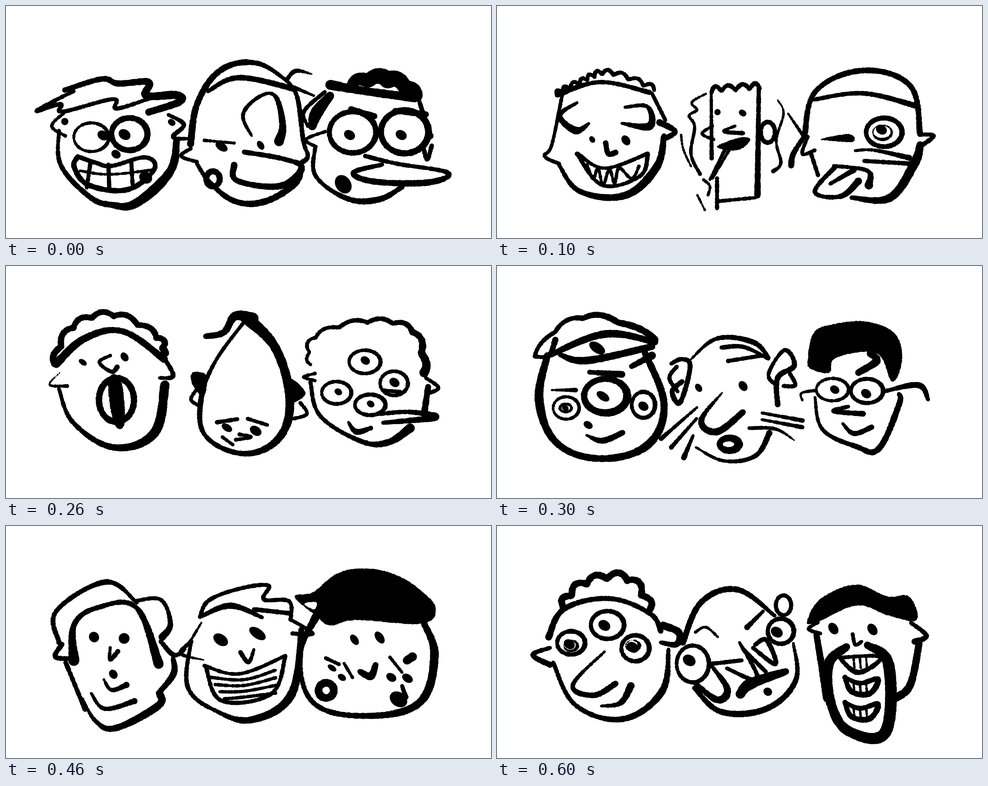
These frames come from a looping animation (1080 by 518 pixels, 0.7 s). An HTML page with a canvas:

```html
<!DOCTYPE html>
<html lang="en">
<head>
<meta charset="utf-8">
<title>Doodle heads</title>
<style>
html, body { margin: 0; width: 100%; height: 100%; overflow: hidden; background: #fff }
canvas { display: block; animation: flip 700ms steps(7) infinite }
@keyframes flip { to { transform: translateY(-100%) } }
</style>
</head>
<body>
<canvas id="strip" width="1080" height="3626"></canvas>
<script>
const ctx = document.getElementById('strip').getContext('2d');
let seed = 7;
const rough = () => (seed = seed * 16807 % 2147483647) / 2147483647 - 0.5;

// Samples a smooth curve through "x y x y ..." as [x, y, progress].
function curve(text, closed) {
  const n = text.split(' ').map(Number), count = n.length / 2, out = [];
  const spans = closed ? count : count - 1;
  const at = (i, k) => n[2 * (closed ? (i + count) % count : Math.max(0, Math.min(count - 1, i))) + k];
  for (let i = 0; i < spans; i++) {
    const steps = Math.ceil(Math.hypot(at(i + 1, 0) - at(i, 0), at(i + 1, 1) - at(i, 1)) / 2) || 1;
    for (let s = 0; s <= steps; s++) {
      const t = s / steps, r = 1 - t;
      const mix = k => {
        const b = at(i, k), c = at(i + 1, k);
        const from = (c - at(i - 1, k)) * 0.55, to = (at(i + 2, k) - b) * 0.55;
        return r * r * (1 + 2 * t) * b + t * t * (3 - 2 * t) * c + r * r * t * from - t * t * r * to;
      };
      out.push([mix(0), mix(1), (i + t) / spans]);
    }
  }
  return out;
}

// Brush stroke; the widths are spread evenly along it.
function ink(samples, widths) {
  ctx.beginPath();
  for (const [x, y, u] of samples) {
    const p = u * (widths.length - 1), i = Math.floor(p);
    const w = widths[i] + ((widths[i + 1] ?? widths[i]) - widths[i]) * (p - i);
    const r = w / 2 + rough() * 1.3;
    ctx.moveTo(x + r, y);
    ctx.arc(x, y, r, 0, 7);
  }
  ctx.fill();
}
const line = (text, ...w) => ink(curve(text), w.length ? w : [9]);

// Stroke with bumps standing out on its left side.
function curls(text, bumps, height, ...w) {
  const base = curve(text);
  ink(base.map(([x, y, u], i) => {
    const [a, b] = [base[Math.max(0, i - 2)], base[Math.min(base.length - 1, i + 2)]];
    const dx = b[0] - a[0], dy = b[1] - a[1], len = Math.hypot(dx, dy) || 1;
    const h = height * Math.abs(Math.sin(u * bumps * Math.PI)) / len;
    return [x + dy * h, y - dx * h, u];
  }), w);
}

function blob(text, color = '#000') {
  ctx.fillStyle = color;
  ctx.beginPath();
  for (const [x, y] of curve(text, true)) ctx.lineTo(x + rough() * 1.5, y + rough() * 1.5);
  ctx.fill();
  ctx.fillStyle = '#000';
}

function dot(x, y, rx, ry = rx) {
  ctx.beginPath();
  ctx.ellipse(x, y, rx, ry, rx === ry ? 0 : rx > ry ? 0.6 : -0.6, 0, 7);
  ctx.fill();
}

// Widths run clockwise from the right.
function ring(x, y, rx, ry, ...w) {
  const steps = Math.ceil((rx + ry) * 1.6);
  ink(Array.from({ length: steps + 1 }, (_, i) => {
    const a = i / steps * 2 * Math.PI;
    return [x + rx * Math.cos(a), y + ry * Math.sin(a), i / steps];
  }), w);
}

function eye(x, y, rx, ry, w, px, py, size) {
  ring(x, y, rx, ry, w + 1, w, w - 1, w, w + 1);
  dot(px, py, size, size * 0.8);
}

function gritted() {
  line('130 188 213 163 250 173 318 170 312 200 380 199 386 214 318 237', 11, 14, 18, 15);
  line('150 190 68 234 122 219 126 236 238 208 246 229 318 207');
  line('118 278 122 355 185 425 235 444 290 440 365 370 380 300', 8, 11, 14, 22, 14);
  line('130 238 102 268 132 290', 7);
  dot(131, 258, 8);
  line('362 243 396 265 372 293 415 296', 8, 11, 6);
  dot(369, 260, 9, 7);
  eye(190, 293, 39, 32, 7, 216, 289, 13);
  eye(275, 286, 40, 36, 13, 264, 287, 14);
  dot(245, 331, 11, 9);
  line('160 336 200 350 235 357 310 338 330 365 270 410 185 400 152 360 160 336', 10, 9, 12, 11);
  line('188 350 180 405');
  line('228 354 230 408');
  line('279 347 282 400');
  line('165 368 230 376 325 366', 6);
  dot(311, 383, 15, 13);
}

function smirk() {
  line('411 308 427 215 480 142 560 128 632 172', 15, 14, 13, 6);
  line('450 190 520 160 645 186', 9, 12, 13);
  line('625 165 645 145 681 152', 8, 10, 3);
  line('640 181 685 200', 9, 5);
  line('620 162 648 202 662 300 672 335 658 350', 6, 11, 9, 12);
  line('412 318 390 335 425 348', 8);
  line('425 352 455 395 510 436 575 437 640 400 658 365', 8, 12, 15, 14);
  line('442 300 508 306', 7, 6);
  dot(480, 314, 15, 9);
  line('547 290 528 242 565 202 600 202 616 265 608 302', 6, 9, 7, 14, 22);
  dot(567, 311, 7, 11);
  line('530 326 620 342 658 362 610 402 515 390 508 355', 11, 11, 16, 12, 14);
  ring(461, 386, 15, 17, 13);
}

function beaky() {
  curls('772 174 850 165 915 200', 4, 8, 24, 38, 25);
  line('722 176 800 190 910 205', 22, 18, 20);
  line('722 200 692 238 682 268', 18, 28, 18);
  line('710 192 664 235 672 268', 9, 8);
  line('918 205 944 290', 8, 15);
  eye(772, 282, 52, 46, 12, 765, 288, 13);
  eye(888, 281, 53, 48, 14, 880, 288, 13);
  line('768 230 820 246', 13);
  line('866 234 935 242', 13);
  line('930 318 938 342 948 312', 10);
  line('800 335 870 352 983 372 940 394 820 392 774 372 838 354', 10, 9, 14, 13, 9);
  line('688 318 690 380 760 430 830 432 882 404', 9, 9, 14, 11);
  line('712 280 668 298 690 314', 7);
  dot(751, 398, 17, 22);
}

function spiky() {
  curls('133 200 190 172 250 153 350 188', 10, 10, 9);
  line('135 198 230 170 340 193', 13, 9, 11);
  line('145 200 122 310 106 335 138 352', 8);
  line('138 355 185 414 285 423 355 360 372 290', 8, 13, 19, 12);
  line('345 195 375 255', 9);
  line('362 260 396 280 370 298', 14, 11);
  line('178 216 140 245 175 278 205 262', 6, 11, 17, 5);
  line('285 226 335 225 340 268 278 262', 7, 9, 18, 6);
  dot(212, 298, 6, 8);
  dot(287, 300, 9, 12);
  line('242 306 248 330 264 327', 12);
  line('180 330 240 362 335 330', 9, 7, 10);
  line('178 330 235 400 318 380 336 332', 9, 8, 10);
  line('200 355 214 385 225 362 236 400 250 365 262 395 272 362 300 385 316 358', 7);
}

function smoker() {
  curls('478 192 585 184', 4, 12, 10);
  line('477 190 478 340', 6, 10);
  line('583 183 580 423', 9, 14);
  line('492 436 575 428', 8);
  line('490 385 490 452', 9);
  dot(491, 237, 7);
  dot(547, 239, 9, 7);
  line('530 268 506 280 548 284', 6, 8, 10);
  blob('490 314 540 294 564 299 535 322');
  line('508 320 474 388', 8, 6);
  line('518 320 480 385', 7, 5);
  line('480 268 457 285 482 298', 7);
  ring(603, 282, 16, 23, 10);
  line('465 196 434 215 445 232 428 245 440 270 432 330 452 375', 5, 8);
  line('410 288 415 320 432 358', 5);
  line('460 388 474 402 470 422', 6);
  line('446 422 463 456', 5);
  line('625 210 638 240 622 300 632 350 615 369', 4, 6, 9);
}

function winker() {
  line('685 290 710 190 815 144 920 178 942 285', 13, 11, 13, 12, 13);
  line('648 240 682 290', 5, 7);
  line('705 209 815 195 930 222', 9, 10, 13);
  line('685 290 660 330 655 356', 10, 14);
  line('692 292 680 330 708 322', 8);
  line('700 332 715 378');
  line('790 428 875 428 930 350 942 310', 9, 18, 21, 15);
  line('940 287 972 290 945 312', 9, 11);
  eye(862, 282, 40, 32, 11, 856, 276, 13);
  ring(858, 282, 21, 16, 5, 7, 3, 2, 5);
  blob('722 297 785 286 793 303 755 302');
  line('798 323 840 322 918 339', 6, 7, 13);
  line('818 346 922 352', 9, 10);
  line('750 357 825 368 828 400', 8, 9, 18);
  line('752 360 708 415 765 425 805 391', 11, 9, 16);
  line('795 366 742 397', 13, 8);
}

function singer() {
  curls('108 218 150 138 240 112 335 160 346 200', 8, 9, 15, 13, 13, 16);
  line('112 218 175 162 260 146 352 208', 19, 16, 13, 16);
  line('120 238 97 265 136 268', 2, 8);
  line('352 205 372 245 342 250', 9, 11, 7);
  line('118 275 150 350 240 405 330 373 354 265', 8, 10, 14, 21, 20);
  dot(171, 215, 10, 6);
  dot(264, 203, 8, 11);
  line('232 200 208 215 235 236 248 225', 7, 8, 11);
  ring(246, 299, 39, 49, 14);
  blob('228 255 256 255 264 352 240 350');
}

function egg() {
  line('530 125 465 215 434 300 445 380 530 419 607 385 632 300 601 185 535 115', 8, 8, 12, 10, 12, 17, 20, 20, 28);
  line('445 157 485 148 510 112 550 117', 12, 16, 26);
  blob('416 238 446 245 440 292 414 262');
  line('425 275 412 298 430 312', 8);
  blob('628 250 667 284 630 304');
  line('655 305 670 330 640 341', 8);
  line('470 349 515 342', 10, 8);
  line('538 341 582 355', 8);
  dot(492, 361, 13, 8);
  dot(556, 368, 14, 10);
  line('520 376 545 382 512 388', 8);
  line('482 382 505 399', 7);
}

function manyEyed() {
  curls('678 220 690 160 805 126 905 148 931 238', 8, 8, 7, 9, 11, 20);
  line('688 240 663 248 688 256', 7);
  line('678 260 700 335 790 391 850 394 900 362', 9, 9, 13, 20);
  line('935 250 963 272 938 285', 8, 9);
  line('940 270 932 325', 14);
  eye(799, 214, 35, 26, 8, 800, 211, 11);
  eye(736, 283, 33, 25, 8, 740, 281, 9);
  eye(864, 262, 31, 27, 8, 865, 260, 12);
  eye(811, 310, 34, 23, 9, 812, 308, 9);
  line('842 278 878 281', 8);
  line('835 330 900 326 955 338 840 350', 9, 10, 16, 9);
  line('762 348 780 370 812 362', 5, 13, 10);
}

function bigEye() {
  curls('84 202 150 132 240 118 352 165', 4, 7, 9, 10, 14, 16);
  line('84 202 115 200 130 165', 9, 9, 15);
  line('352 170 240 152 115 200', 13, 17, 12);
  line('140 198 200 211 345 180', 10, 17, 15);
  dot(223, 183, 20, 11);
  line('112 200 94 300 133 395 230 430 335 400 372 310 330 195', 14, 20, 15, 15, 18, 16, 14);
  line('300 224 345 200', 11, 17);
  ring(242, 290, 48, 38, 18, 17, 14, 13, 18);
  dot(236, 291, 16, 9);
  line('206 237 278 242', 10, 15);
  eye(154, 317, 29, 25, 7, 152, 317, 8);
  ring(153, 317, 13, 9, 6);
  line('122 277 176 277', 4, 10);
  eye(326, 310, 26, 29, 9, 326, 313, 12);
  dot(203, 355, 11, 8);
  line('200 378 235 390 280 372', 5, 14, 12);
}

function whiskers() {
  line('430 210 490 162 570 170 605 205', 4, 10, 12, 9);
  line('500 182 550 181 605 208', 10, 10, 7);
  line('515 212 590 200', 9);
  line('388 218 412 208 430 225 408 304 390 280 412 258', 9, 11, 12);
  line('400 225 384 250 402 280', 9);
  line('620 265 605 240 640 188 662 222 625 250 625 310', 9, 8, 12, 12);
  line('638 268 664 266 652 240');
  dot(449, 272, 7, 10);
  dot(548, 268, 9, 12);
  line('502 282 455 345 490 370 548 326', 3, 13, 16, 13);
  ring(517, 398, 21, 14, 19, 15, 13, 15, 19);
  line('443 405 505 435 575 424 607 372', 5, 9, 13);
  line('445 316 365 386', 5, 10);
  line('445 340 388 405', 6, 10);
  line('437 378 416 428', 6, 12);
  for (const y of [328, 343]) line(`590 ${y} 680 ${y + 17}`, 6, 10);
  line('562 362 620 364 662 389', 8, 8, 3);
}

function glasses() {
  blob('692 210 705 150 745 131 820 124 885 150 902 208 880 258 845 195 755 205 740 238 700 230');
  line('830 195 845 212 805 238', 14, 18, 14);
  eye(747, 276, 36, 25, 7, 752, 276, 11);
  eye(824, 279, 36, 27, 9, 822, 285, 12);
  line('680 300 678 284 708 278', 5, 7);
  line('862 280 938 266 960 298', 8, 14, 8);
  line('708 293 725 365 800 403 850 408 895 310 895 285', 6, 9, 13, 14, 9);
  line('782 314 750 324 815 330', 8, 12);
  line('770 352 795 374 834 360', 6, 11, 12);
}

function longChin() {
  line('118 260 112 190 222 125 292 172', 11, 10, 12, 7);
  line('151 300 152 220 205 182 290 182 340 308', 24, 12, 11, 11, 22);
  line('290 167 345 165 366 218 348 248', 8, 9, 17);
  line('125 264 110 292 148 296', 11);
  line('345 258 374 288 400 275', 10, 11, 5);
  dot(196, 248, 11, 12);
  dot(263, 251, 12);
  line('232 272 232 298 249 280', 6, 9, 11);
  dot(239, 331, 9, 11);
  line('218 343 235 366 268 355', 5, 9, 13);
  line('190 374 220 408 286 391', 6, 9, 13);
  line('133 305 176 410', 10);
  line('170 385 200 436 245 451 338 402 343 375', 5, 11, 17, 16);
  line('340 373 373 330 372 295', 12, 15, 10);
}

function laugher() {
  line('432 203 452 166 520 140 584 133 574 164 630 168 634 210');
  line('434 202 500 178 570 204', 8, 14, 8);
  line('552 186 632 195', 10);
  line('632 208 683 240 638 240', 7, 9);
  line('435 216 410 258', 4, 7);
  line('412 258 390 285 440 299', 10, 9, 3);
  line('412 258 405 360 470 414 550 432 636 375 658 230', 8, 10, 9, 16, 19, 12);
  dot(478, 254, 18, 12);
  dot(560, 240, 21, 11);
  line('522 282 540 304 552 276', 10, 9, 7);
  line('442 312 520 330 622 290', 8);
  line('445 315 480 390 590 375 622 292', 9);
  for (let i = 0; i < 4; i++) line(`${456 + i * 10} ${338 + i * 16} 530 ${343 + i * 13} 600 ${322 + i * 17}`, 7);
}

function beret() {
  blob('643 158 683 148 740 105 805 95 870 110 925 145 957 185 925 218 780 210 722 222 690 200');
  blob('664 174 690 170 687 186', '#fff');
  line('690 202 655 290 685 395 800 424 920 395 954 290 930 215', 18, 10, 11, 13, 18, 19, 13);
  dot(776, 254, 8, 13);
  dot(832, 249, 9, 15);
  line('788 325 812 335 823 310', 12, 18, 12);
  line('712 295 742 309', 8);
  line('753 307 772 339', 7);
  line('855 293 882 327', 7);
  dot(726, 317, 11, 6);
  dot(748, 338, 10, 7);
  dot(858, 338, 12, 9);
  dot(894, 340, 13, 9);
  line('893 300 905 292', 20);
  ring(713, 367, 17, 17, 17);
  dot(874, 387, 21, 16);
  line('882 357 890 382', 8, 12);
}

function manyBrows() {
  line('127 120 265 108', 19);
  line('208 106 208 62 262 65 248 104', 13, 12, 20);
  line('190 125 132 185 127 260', 10, 13, 9);
  line('265 108 342 155 358 255', 8, 11, 9);
  line('140 270 112 300 150 316', 11, 14, 12);
  line('365 268 395 275 385 304 345 285', 8, 12, 9);
  line('152 310 170 390 255 434 338 390 350 290', 8, 9, 11, 17, 19);
  line('145 185 180 168 222 188', 14, 9);
  line('242 160 275 145 312 175', 14, 8);
  line('160 213 195 208 230 228', 11, 8);
  line('252 202 280 190 310 212', 13, 9);
  line('168 264 195 245 232 265', 12, 8);
  line('268 250 295 232 328 260', 12, 8);
  dot(209, 281, 16, 14);
  dot(301, 274, 16, 13);
  line('252 295 306 330 305 352 228 340', 11, 10, 19, 9);
  line('194 348 225 388 268 380', 11, 11, 18);
}

function hangingTeeth() {
  curls('415 352 406 250 430 165 520 136 620 165 667 302', 8, 4, 24, 22, 42, 38, 24, 19);
  line('430 245 460 204 525 208', 6, 12, 17);
  line('545 192 600 184', 13, 18);
  dot(487, 238, 16, 13);
  dot(583, 230, 18, 17);
  line('530 252 530 298 560 293', 13, 14, 20);
  line('456 303 530 336 620 290', 5, 15, 20);
  line('475 330 478 400 518 385 508 335', 9, 12, 18);
  line('530 340 552 395 582 382 575 330', 9, 12, 18);
  line('590 325 620 378 643 357 625 315', 9, 14, 12);
  line('498 345 500 393', 6);
  line('550 338 558 385', 7);
  line('605 325 617 368', 8);
}

function curlyBig() {
  line('708 195 770 136 830 124', 20, 28, 28);
  curls('825 130 890 140 950 195 946 258', 5, 7, 13, 24, 18, 11);
  line('715 222 681 235 716 246', 8);
  line('707 250 710 350 770 429 850 434 930 345 940 245', 17, 10, 14, 20, 18, 16);
  dot(760, 227, 10, 14);
  dot(825, 181, 10, 15);
  line('830 221 870 270 835 305 806 275', 6, 13, 16, 19);
  line('756 297 745 328 800 325 784 308', 11, 13, 10);
  blob('751 355 836 362 828 395 768 401');
  line('886 295 928 335', 10, 7);
  line('862 328 925 352', 9, 13);
}

function threeEyed() {
  curls('147 180 200 130 290 122 340 188', 6, 13, 15);
  line('115 248 150 185 250 162 340 195 365 235', 15, 12, 11, 11, 12);
  line('118 272 80 288 118 310', 9, 13);
  line('125 305 175 400 280 431 367 370 382 275', 9, 10, 13, 16, 8);
  line('370 222 405 238 400 264 365 260', 17, 16, 9);
  eye(165, 261, 31, 26, 10, 161, 264, 13);
  eye(246, 221, 37, 31, 10, 239, 222, 14);
  eye(308, 273, 31, 29, 10, 302, 271, 14);
  for (const x of [164, 302]) ring(x, 267, 15, 12, 8, 6, 2, 2, 8);
  line('240 280 169 355 215 378 264 352', 5, 12, 13);
  line('232 402 275 395 298 357', 6, 12, 17);
}

function jumbled() {
  line('414 260 455 170 535 142 618 200', 13, 13, 13, 8);
  ring(638, 177, 17, 22, 9);
  line('660 262 665 345 600 408 500 415 440 362', 6, 13, 14, 10);
  eye(436, 308, 36, 41, 9, 428, 300, 15);
  eye(632, 235, 29, 28, 10, 623, 237, 14);
  line('442 237 465 226 492 248', 6);
  line('557 226 592 191', 12, 7);
  line('440 350 490 388 513 365 480 315', 10, 18, 8);
  line('475 308 545 300', 9);
  line('512 318 580 342 540 260', 8, 11, 7);
  line('548 275 598 325');
  line('570 272 620 308 600 255 575 265', 9, 11, 10);
  line('542 375 565 352 643 325', 20, 25, 15);
  dot(603, 370, 10, 9);
}

function bearded() {
  blob('693 205 724 160 800 131 868 157 918 158 934 210 872 200 800 178 705 218');
  line('715 215 694 230 720 240', 8);
  line('711 240 735 385', 13, 18);
  line('940 262 920 355 885 385', 15, 19);
  line('922 216 956 245 930 258', 9, 13);
  dot(749, 229, 10, 14);
  dot(836, 231, 10, 14);
  line('792 242 798 265 812 258', 8);
  line('778 270 738 310 745 400 785 459 865 460 872 310 825 266', 17, 23, 21, 22, 26, 25, 15);
  line('762 294 854 292 805 327 762 294', 8, 9, 12, 8);
  for (const y of [338, 394]) line(`775 ${y} 790 ${y + 32} 830 ${y + 36} 848 ${y + 4} 808 ${y + 13} 775 ${y}`, 11, 13, 9);
  for (const x of [794, 808, 822]) {
    for (const y of [295, 352, 406]) line(`${x} ${y} ${x + 2} ${y + 22}`, 5);
  }
}

const trios = [
  [gritted, smirk, beaky], [spiky, smoker, winker], [singer, egg, manyEyed], [bigEye, whiskers, glasses],
  [longChin, laugher, beret], [manyBrows, hangingTeeth, curlyBig], [threeEyed, jumbled, bearded]
];
trios.forEach((heads, i) => {
  ctx.setTransform(1, 0, 0, 1, 0, i * 518);
  heads.forEach(draw => draw());
});
</script>
</body>
</html>
```
